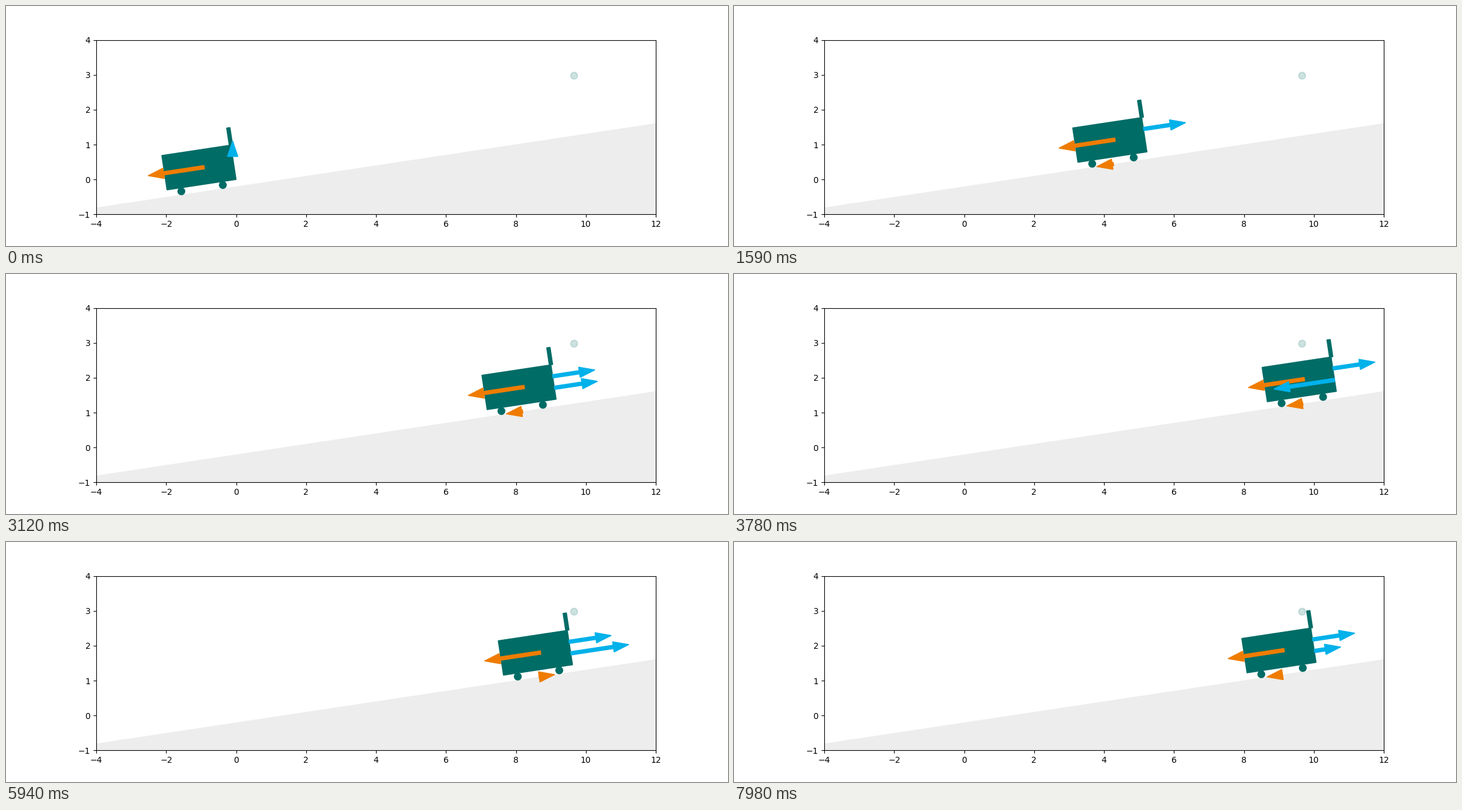
Write a matplotlib script that moves like this. It is 1200 px wide and 400 px high and loops after 8 s.

```python
import numpy as np
import matplotlib.pyplot as plt
from matplotlib.animation import FuncAnimation
from matplotlib.patches import Circle, FancyArrow, Polygon, Rectangle
from matplotlib.transforms import Affine2D

GREEN, ORANGE, BLUE, GREY = "#006c66", "#ef7c00", "#00b1ea", "#ededed"
FRAMES, LOOP_MS, STEP = 267, 8000, 0.03
ANGLE = 0.15
COS, SIN, SLOPE = np.cos(ANGLE), np.sin(ANGLE), np.tan(ANGLE)

# Feedforward thrust: push, coast, brake, hold
PUSH, HOLD, BRAKE = 6.2, 0.77, -4.76
PUSH_END, BRAKE_START, BRAKE_END = 0.54, 2.19, 2.70

# Key moments of the approach: time, distance along the slope, speed
KEYS = [(0, 0, 0), (PUSH_END, 1.153, 4.27), (BRAKE_START, 7.33, 3.2),
        (BRAKE_END, 8.40, 1.1), (3.24, 9.58, 2.72), (4.32, 11.217, 0)]
PEAK_TIME, PEAK = KEYS[-1][:2]

# Damped swing about the resting place after the peak
REST, DECAY, OMEGA = 10.06, 0.6, 1.67

# Feedback gains
BIAS, GAIN, DAMPING = 0.53, 1.68, 0.41


def hermite(t, start, end):
    """Position and speed on the cubic between two key moments."""
    (t0, s0, v0), (t1, s1, v1) = start, end
    h = t1 - t0
    q = (t - t0) / h
    s = ((2*q**3 - 3*q**2 + 1) * s0 + (q**3 - 2*q**2 + q) * h * v0
         + (3*q**2 - 2*q**3) * s1 + (q**3 - q**2) * h * v1)
    v = (6*(q**2 - q) * (s0 - s1) / h + (3*q**2 - 4*q + 1) * v0
         + (3*q**2 - 2*q) * v1)
    return s, v


def motion(t):
    for start, end in zip(KEYS, KEYS[1:]):
        if t <= end[0]:
            return hermite(t, start, end)
    tau = t - PEAK_TIME
    swing = (PEAK - REST) * np.exp(-DECAY * tau)
    c, s = np.cos(OMEGA * tau), np.sin(OMEGA * tau)
    return (REST + swing * (c + DECAY / OMEGA * s),
            -swing * (OMEGA + DECAY**2 / OMEGA) * s)


def thrust(t):
    if t == 0:
        return 0
    if t < PUSH_END + STEP / 2:
        return PUSH
    if BRAKE_START - STEP / 2 < t < BRAKE_END + STEP / 2:
        return BRAKE
    return HOLD


def to_world(u, v):
    return u * COS - v * SIN, u * SIN + v * COS


fig, ax = plt.subplots(figsize=(12, 4), dpi=100)
ax.set_aspect("equal")
ax.set_xlim(-4, 12)
ax.set_ylim(-1, 4)

ground = [(x, SLOPE * x - 0.2) for x in (-4, 12)]
ax.add_patch(Polygon(ground + [(12, -1), (-4, -1)],
                     facecolor=GREY, edgecolor="none"))
ax.add_patch(Circle(to_world(10, 1.5), 0.1, color=GREEN, alpha=0.2))

cart = [Rectangle((-2, 0), 2, 1, color=GREEN),
        Rectangle((-0.05, 1), 0.1, 0.5, color=GREEN),
        Circle((-1.6, -0.1), 0.1, color=GREEN),
        Circle((-0.4, -0.1), 0.1, color=GREEN)]
for part in cart:
    ax.add_patch(part)


def add_arrow(color):
    return ax.add_patch(FancyArrow(0, 0, 1, 0, width=0.1, color=color))


gravity, friction = add_arrow(ORANGE), add_arrow(ORANGE)
forward, feedback = add_arrow(BLUE), add_arrow(BLUE)


def place(arrow, u, v, length):
    x, y = to_world(u, v)
    arrow.set_data(x=x, y=y, dx=length * COS, dy=length * SIN)


def update(n):
    t = n * STEP
    s, speed = motion(t)
    pose = Affine2D().translate(s, 0).rotate(ANGLE) + ax.transData
    for part in cart:
        part.set_transform(pose)

    place(gravity, s - 0.85, 0.485, -1.175)
    place(friction, s - 1, -0.2, -0.01 * speed)
    place(forward, s, 2 / 3, thrust(t))
    place(feedback, s, 1 / 3, BIAS + GAIN * (REST - s) - DAMPING * speed)
    friction.set_visible(n > 0)
    feedback.set_visible(t > BRAKE_START - STEP / 2)
    return [*cart, gravity, friction, forward, feedback]


anim = FuncAnimation(fig, update, frames=FRAMES, init_func=lambda: update(0),
                     interval=LOOP_MS / FRAMES, repeat=True, repeat_delay=0)
plt.show()
```
